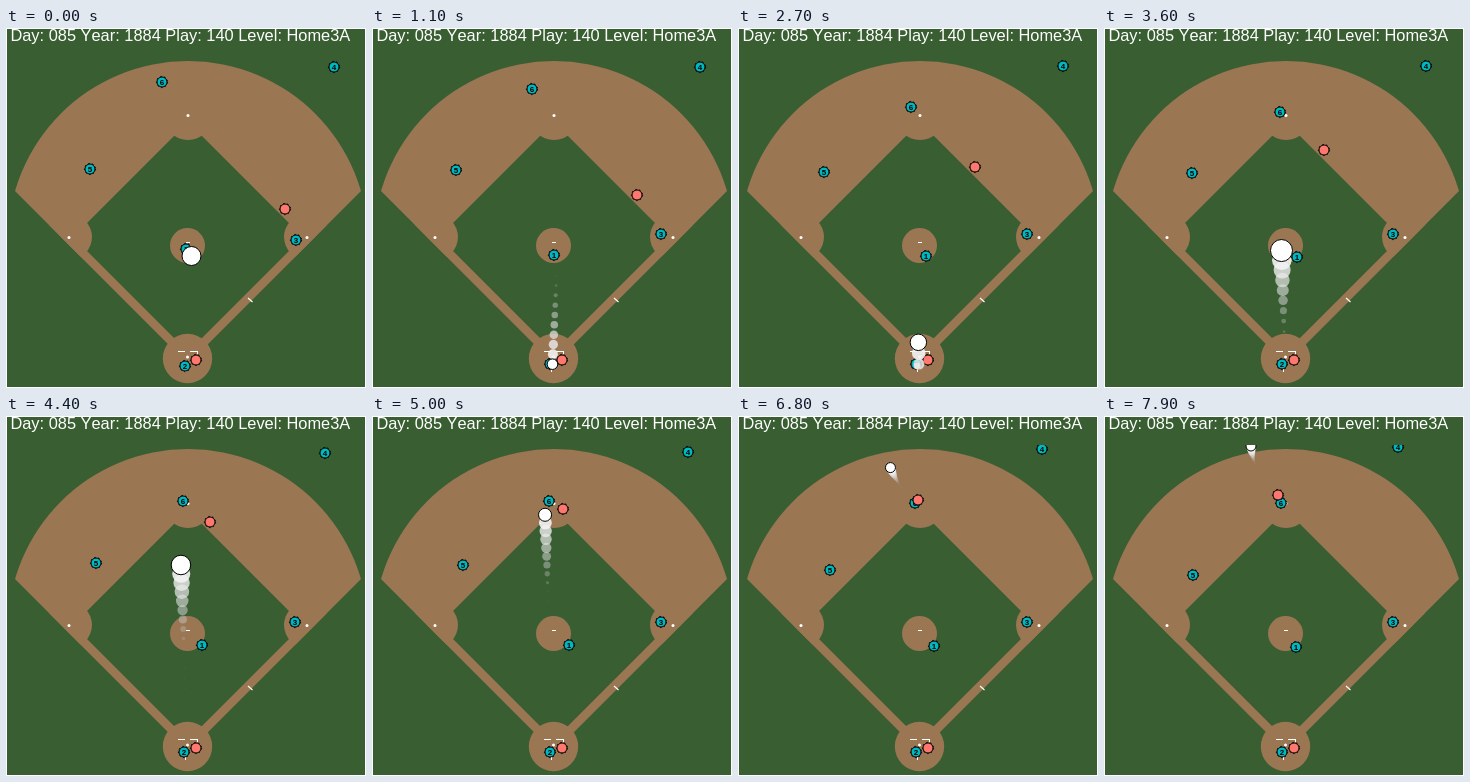
Recreate the animation shown at these times as an HTML page with a canvas. Size 360 px wide and 360 px high, loop 8000 ms.

```html
<!DOCTYPE html>
<html lang="en">
<head>
<meta charset="utf-8">
<title>Baseball play</title>
<style>
  html, body { margin: 0; width: 100%; height: 100%; overflow: hidden; background: #385e32; }
  canvas { display: block; width: 360px; height: 360px; }
</style>
</head>
<body>
<canvas id="stage" width="360" height="360"></canvas>
<script>
const ctx = document.getElementById('stage').getContext('2d');
const LOOP = 8000, STEP = 100, TRAIL = 14;
const GRASS = '#385e32', DIRT = '#9b7653', TEAL = '#00b8c0', SALMON = '#ff7870';
const { PI, sin, cos, exp, pow, max, min, round, floor } = Math;

const mix = (a, b, u) => a + (b - a) * u;
const span = (t, from, to) => min(1, max(0, (t - from) / (to - from)));
const smooth = u => u * u * (3 - 2 * u);
const slowing = (u, k) => u + k * u * (1 - u);

// Where everyone stands at time t, in ms.
const fielders = {
  1: t => [189 - 9 * cos(PI * t / 5700), 227 + 4 * t / LOOP - 6 * exp(-t / 300)],
  2: t => [177.6 + exp(-t / 400), 336 + 2 * exp(-t / 500)],
  3: t => [289 + exp(-t / 400), 206 + 6 * exp(-t / 400)],
  4: t => {
    const u = pow(t / LOOP, 2.2);
    return [328 - 35 * u, 39 - 8 * u];
  },
  5: t => [84 + 8 * sin(PI * pow(t / 8900, 2)), 141 + 18 * pow(t / LOOP, 1.8)],
  6: t => {
    const u = smooth(span(t, 0, 3600));
    return [mix(155.5, 176, u) + t / LOOP, mix(53.5, 81.5, u) + 6 * t / LOOP];
  }
};

function runner(t) {
  const run = 93 * pow(span(t, 0, 5250), 1.2), drift = span(t, 5700, 7900);
  return [279 - run - 12 * drift, 181 - run - 9 * drift];
}

const batter = () => [190, 332];

// The ball's place and radius: pitch, catch, throw to second, roll away.
function ball(t) {
  if (t <= 1200) {
    const u = t / 1200;
    return [mix(185.5, 180, u), mix(228, 346, u), mix(9.5, 5, slowing(u, 0.3))];
  }
  if (t < 2500) return [179, 338, 5];
  if (t <= 5200) {
    const u = span(t, 2500, 5200);
    return [mix(181, 172.4, u), mix(336, 83, slowing(u, 0.17)), mix(7, 5, u) + 20 * u * (1 - u)];
  }
  const u = span(t, 5200, 7900);
  return [mix(172.4, 147, slowing(u, 0.8)), mix(83, 30, u), 5];
}

function disc(x, y, r, fill) {
  ctx.beginPath();
  ctx.arc(x, y, r, 0, PI * 2);
  ctx.fillStyle = fill;
  ctx.fill();
}

function ring(x, y, r, dash = []) {
  ctx.beginPath();
  ctx.arc(x, y, r, 0, PI * 2);
  ctx.setLineDash(dash);
  ctx.strokeStyle = '#000';
  ctx.lineWidth = 1;
  ctx.stroke();
  ctx.setLineDash([]);
}

function poly(fill, ...pts) {
  ctx.beginPath();
  pts.forEach(([x, y]) => ctx.lineTo(x, y));
  ctx.closePath();
  ctx.fillStyle = fill;
  ctx.fill();
}

// A square standing on its corner
const diamond = (fill, x, y, r) => poly(fill, [x - r, y], [x, y - r], [x + r, y], [x, y + r]);

function mark(x, y, w, h) {
  ctx.fillStyle = '#fff';
  ctx.fillRect(x, y, w, h);
}

function drawField() {
  ctx.fillStyle = GRASS;
  ctx.fillRect(0, 0, 360, 360);

  // Infield dirt, cut off along the foul lines
  ctx.save();
  ctx.beginPath();
  ctx.moveTo(182, 336);
  ctx.lineTo(-154, 0);
  ctx.lineTo(518, 0);
  ctx.clip();
  disc(182, 213, 180, DIRT);
  diamond(DIRT, 182, 209, 127);
  diamond(GRASS, 182, 209, 115);
  disc(63, 209, 23, DIRT);
  disc(301, 209, 23, DIRT);
  disc(182, 88, 24, DIRT);
  ctx.restore();

  disc(181.5, 217.5, 17.5, DIRT);
  disc(181.5, 330.5, 24.7, DIRT);

  disc(63, 209.5, 1.5, '#fff');
  disc(301, 209.5, 1.5, '#fff');
  disc(182, 87.5, 1.5, '#fff');
  disc(181.5, 329, 1.5, '#fff');
  mark(180, 214, 4, 1);
  mark(172, 323, 7, 1);
  mark(184, 323, 8, 1);
  mark(191, 323, 1, 3);
  mark(179, 341, 1, 3);
  ctx.strokeStyle = '#fff';
  ctx.lineWidth = 1.2;
  ctx.beginPath();
  ctx.moveTo(242, 270);
  ctx.lineTo(246.5, 274);
  ctx.stroke();
}

function drawPerson([px, py], fill, label) {
  const x = round(px), y = round(py);
  disc(x, y, 5, fill);
  ring(x, y, 5);
  ring(x, y, 5.6, [1.5, 2.5]);
  if (!label) return;
  ctx.fillStyle = '#000';
  ctx.font = 'bold 8px "Liberation Sans", Arial, sans-serif';
  ctx.textAlign = 'center';
  ctx.fillText(label, x, y + 3);
}

function drawBall(t) {
  for (let age = min(TRAIL, t / STEP); age > 0; age--) {
    const [x, y, r] = ball(t - age * STEP);
    const grey = 250 - 8 * age;
    ctx.globalAlpha = max(0.15, 1 - age / 11);
    disc(x, y, max(0.6, r * (1 - age / 9.5)), `rgb(${grey}, ${grey}, ${grey})`);
  }
  ctx.globalAlpha = 1;
  const [x, y, r] = ball(t);
  disc(x, y, r, '#fff');
  ring(x, y, r);
}

function draw(t) {
  drawField();
  ctx.save();
  ctx.beginPath();
  ctx.rect(0, 29, 360, 331);
  ctx.clip();
  for (const n in fielders) drawPerson(fielders[n](t), TEAL, n);
  drawPerson(runner(t), SALMON);
  drawPerson(batter(), SALMON);
  drawBall(t);
  ctx.restore();

  ctx.fillStyle = '#fff';
  ctx.font = '16.4px "Liberation Sans", Arial, sans-serif';
  ctx.fontKerning = 'none';
  ctx.textAlign = 'left';
  ctx.fillText('Day: 085 Year: 1884 Play: 140 Level: Home3A', 4.4, 13);

  ctx.strokeStyle = '#fff';
  ctx.lineWidth = 1;
  ctx.strokeRect(0.5, 0.5, 359, 359);
}

const start = performance.now();
function tick() {
  const t = (performance.now() - start) % LOOP;
  draw(floor(t / STEP) * STEP);
  requestAnimationFrame(tick);
}
tick();
</script>
</body>
</html>
```
